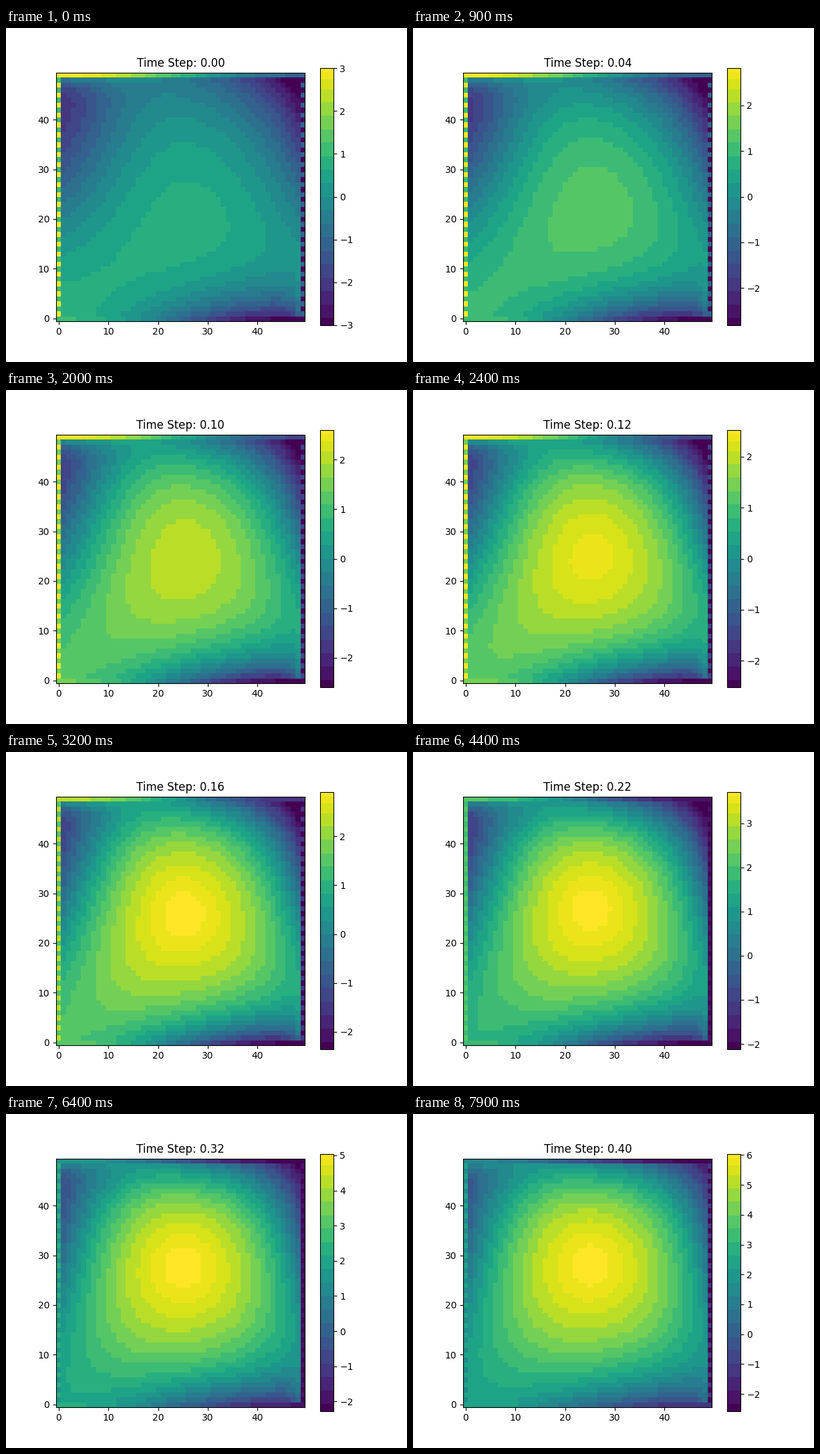
Animation, 600 px wide and 500 px high, one loop 8 s. Source, as a matplotlib script:

```python
import numpy as np
import matplotlib.pyplot as plt
from matplotlib.animation import FuncAnimation
from matplotlib.colors import ListedColormap

N = 50
FRAMES = 80
DT = 0.005


def hump(s, power=0.7):
    return np.clip(np.sin(np.pi * s), 0, 1) ** power


def rise(s):
    """Grows smoothly from 0 to 2 across the plate."""
    return 1 - np.cos(np.pi * s)


def cut(s, depth):
    """Drops off sharply close to s = 1."""
    return 1 - depth * s ** 27


s = np.linspace(0, 1, N)
x, y = np.meshgrid(s, s)
bump = hump(x) * hump(y ** 1.45)
wave = 2 * np.cos(np.pi * s)
parity = np.where(np.arange(N) % 2 == 0, 1, -1)

# Starting field: a low dome with a cold stretch along each edge
left = 1.55 * rise(y) * np.exp(-(x / 0.3) ** 1.5) * cut(y, 0.9)
right = 1.4 * rise(y) * np.exp((x - 1) / 0.2)
bottom = 1.8 * rise(x) * np.exp(-y / 0.12) * cut(x, 0.6)
top = rise(x) * np.exp((y - 1) / 0.18)
dome = 0.36 * hump(x, 1) * hump(y, 1)
start = 0.78 + dome - left - right - bottom - top


def field(t):
    """Values on the grid and the colour limits at time t."""
    peak = 0.78 + 13.3 * t
    u = start + t * (4 + 9.5 * bump)
    u += (peak - u.max()) * bump

    # The edges alternate from row to row
    swing = (4 * t - 1) * parity
    u[:, 0] = wave[0] + swing
    u[:, -1] = wave[-1] + swing
    u[0] = wave + swing[0]
    u[-1] = wave + swing[-1]
    low = min(4 * t - 3, -1 - 4 * t)
    high = max(3 - 4 * t, peak)
    return u, low, high


def banded_viridis():
    """Viridis in even steps, with finer ones in the yellows."""
    tones = np.append(np.arange(17) / 19, [0.895, 0.94, 0.972, 1.0])
    v = np.linspace(0, 1, 512)
    near = np.abs(v[:, None] - tones).argmin(axis=1)
    return ListedColormap(plt.get_cmap("viridis")(tones[near]))


plt.rcParams["font.family"] = "DejaVu Sans"
fig, ax = plt.subplots(figsize=(6, 5), dpi=100)
u, low, high = field(0)
im = ax.imshow(u, cmap=banded_viridis(), origin="lower", vmin=low, vmax=high,
               interpolation="nearest")
fig.colorbar(im)
title = ax.set_title("Time Step: 0.00", x=0.501)


def update(i):
    t = i * DT
    u, low, high = field(t)
    im.set_data(u)
    im.set_clim(low, high)
    title.set_text(f"Time Step: {t:.2f}")
    return im, title


anim = FuncAnimation(fig, update, frames=FRAMES, interval=100, repeat=True)
plt.show()
```
